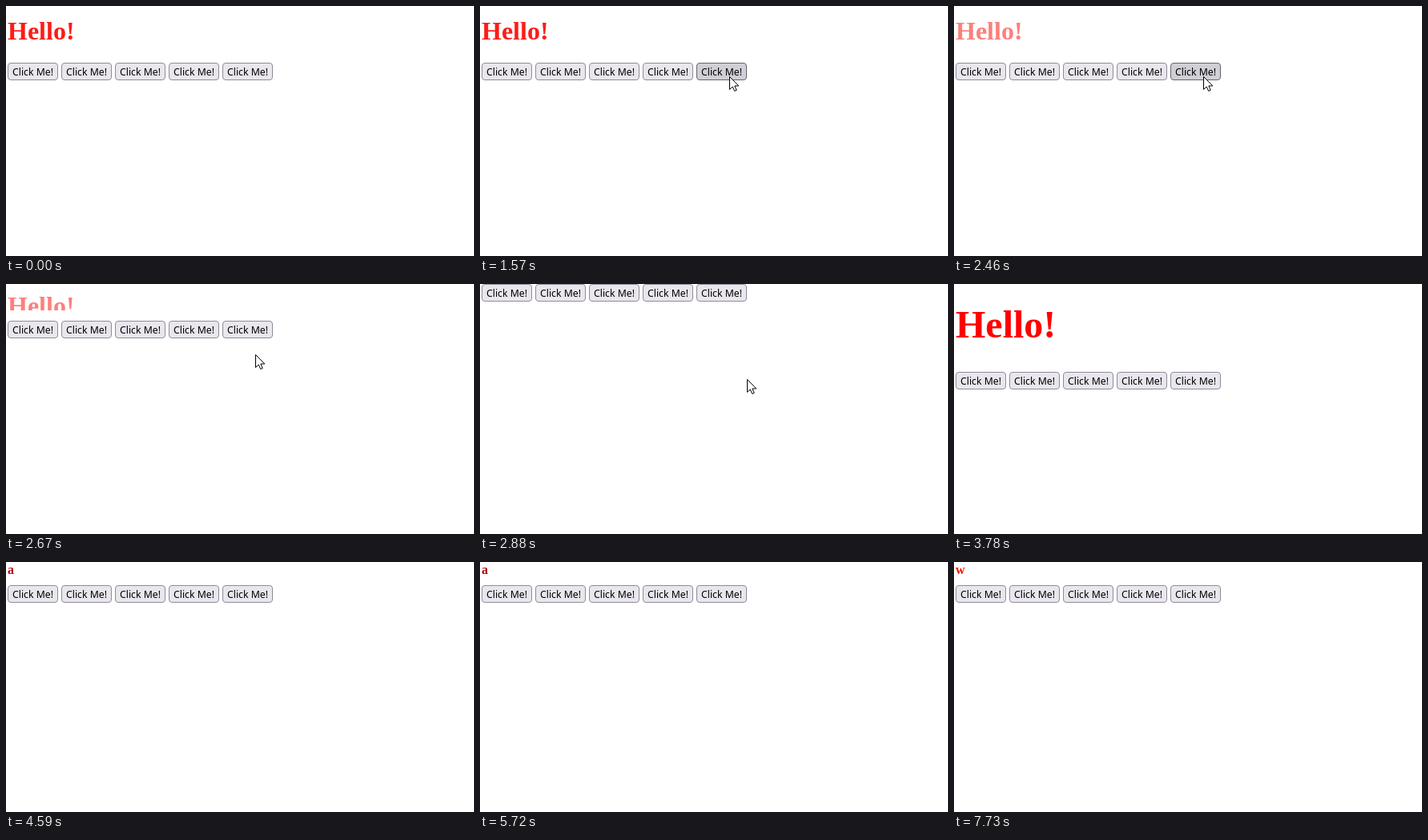
Animation of 584x313 px, one loop 8000 ms. Source, as an HTML page:

```html
<!DOCTYPE html>
<html lang="en">
<head>
<meta charset="utf-8">
<title>Click Me</title>
<style>
  html, body { margin: 0; width: 100%; height: 100%; overflow: hidden; background: #fff; }
  svg { display: block; width: 584px; height: 313px; }
  #title { font-family: "Liberation Serif", "Times New Roman", serif; font-weight: bold; }
  .button rect { fill: #e9e6ed; stroke: #8f8c9a; }
  .button text { font: 12.25px "Noto Sans", "Open Sans", sans-serif; text-anchor: middle; fill: #000; }
  .hover rect { fill: #d0cfd6; stroke: #676571; }
  .active rect { fill: #b1b1b9; stroke: #484851; }
  #cursor { fill: #fff; stroke: #000; }
</style>
</head>
<body>
<svg viewBox="0 0 584 313">
  <clipPath id="window"><rect id="view" width="584"/></clipPath>
  <g clip-path="url(#window)"><text id="title" x="2"></text></g>
  <g id="row"></g>
  <path id="cursor" d="M.5.5V16.5L4.2 13L6.7 18.5L9.2 17.4L6.8 12H11.8Z"/>
</svg>
<script>
const LOOP = 8000, STEP = 70;
const $ = id => document.getElementById(id);
const title = $("title"), view = $("view"), row = $("row"), cursor = $("cursor");

row.innerHTML = [0, 1, 2, 3, 4].map(i => `<g class="button" transform="translate(${2 + 67 * i})">
  <rect x=".5" y=".5" width="62" height="21" rx="3.5"/><text x="31.5" y="16">Click Me!</text></g>`).join("");
const lastButton = row.lastElementChild;

// Heading layouts: font size, box top, box height, baseline, row of buttons
const medium = { size: 32, top: 12, height: 38, base: 42, row: 71 };
const large = { size: 48, top: 23, height: 56, base: 67, row: 110 };
const small = { size: 16, top: 0, height: 19, base: 15, row: 29 };

const keys = [
  [4590, "a", "#b5000f"], [5190, "d", "#d80008"], [5720, "a", "#b5000f"],
  [7330, "w", "#f01400"], [7530, "s", "#d80008"], [7730, "w", "#f01400"]
];

// Pointer stops: time, x, y
const pointer = [
  [660, 517, 297], [800, 459, 237], [940, 404, 180], [1080, 361, 138],
  [1220, 331, 109], [1360, 314, 94], [1430, 311, 91], [1500, 311, 89],
  [1570, 311, 88], [2740, 311, 88], [2810, 319, 98], [2880, 333, 119],
  [3020, 358, 186], [3160, 384, 284], [3230, 392, 320]
];

const lerp = (a, b, p) => a + (b - a) * p;
const swing = p => 0.5 - Math.cos(p * Math.PI) / 2;

// Eased progress sampled at the screen's refresh step
function progress(t, start, end) {
  const elapsed = Math.floor((t - start) / STEP) * STEP;
  return swing(Math.min(1, Math.max(0, elapsed / (end - start))));
}

function setHeading(text, color, layout, open = 1, opacity = 1) {
  title.textContent = text;
  title.setAttribute("fill", color);
  title.setAttribute("font-size", layout.size);
  title.setAttribute("opacity", opacity);
  title.setAttribute("y", Math.round(layout.base - layout.top * (1 - open)));
  view.setAttribute("y", Math.round(layout.top * open));
  view.setAttribute("height", Math.round(layout.height * open));
  row.setAttribute("transform", `translate(0 ${Math.round(layout.row * open)})`);
}

function drawHeading(t) {
  const key = keys.filter(k => t >= k[0]).pop();
  if (key) setHeading(key[1], key[2], small);
  else if (t >= 3360) setHeading("Hello!", "#f00", large, progress(t, 3360, 3780));
  else {
    const fade = progress(t, 2040, 2460);
    const open = 1 - progress(t, 2530, 2880);
    setHeading("Hello!", "#fc1c17", medium, open, lerp(1, 0.56, fade));
  }
}

function drawPointer(t) {
  const shown = t >= 660 && t < 3230;
  cursor.style.display = shown ? "" : "none";
  if (!shown) return;
  const origin = t < 2600 ? 660 : 2600;
  const at = origin + Math.floor((t - origin) / STEP) * STEP;
  const i = pointer.findIndex(p => p[0] > at);
  const a = pointer[i - 1], b = pointer[i];
  const p = (at - a[0]) / (b[0] - a[0]);
  const x = Math.round(lerp(a[1], b[1], p)), y = Math.round(lerp(a[2], b[2], p));
  cursor.setAttribute("transform", `translate(${x} ${y})`);
}

function draw(t) {
  drawHeading(t);
  drawPointer(t);
  lastButton.classList.toggle("hover", t >= 1430 && t < 2600);
  lastButton.classList.toggle("active", t >= 1970 && t < 2040);
}

const begin = performance.now();
function frame() {
  draw((performance.now() - begin) % LOOP);
  requestAnimationFrame(frame);
}
frame();
</script>
</body>
</html>
```
